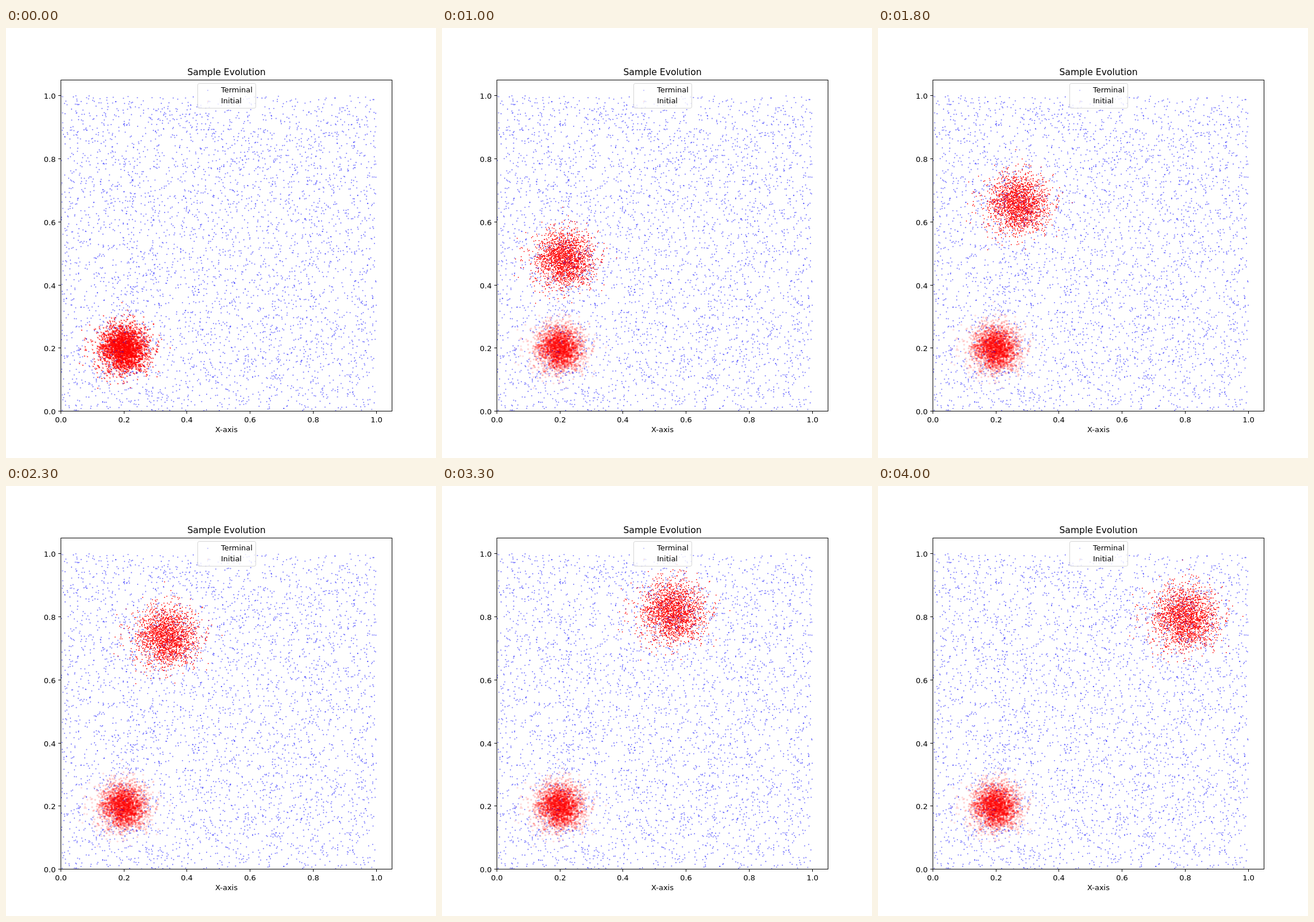
These frames come from a looping animation (748x748 px, 4100 ms). An HTML page with a canvas:

```html
<!DOCTYPE html>
<html lang="en">
<head>
<meta charset="utf-8">
<title>Sample Evolution</title>
<style>
  html, body { margin: 0; width: 100%; height: 100%; overflow: hidden; background: #fff; }
  canvas { display: block; }
</style>
</head>
<body>
<canvas id="stage" width="748" height="748"></canvas>
<script>
const ctx = document.getElementById('stage').getContext('2d');
const STEP = 100, STEPS = 41;
const LEFT = 95.5, TOP = 90.5, SIZE = 576, BOTTOM = TOP + SIZE;
const UNIT = SIZE / 1.05;
const px = x => LEFT + x * UNIT;
const py = y => BOTTOM - y * UNIT;

let seed = 20240;
function random() {
  seed = (seed + 0x6D2B79F5) | 0;
  let r = Math.imul(seed ^ (seed >>> 15), 1 | seed);
  r = (r + Math.imul(r ^ (r >>> 7), 61 | r)) ^ r;
  return ((r ^ (r >>> 14)) >>> 0) / 4294967296;
}
function gaussian() {
  const r = Math.sqrt(-2 * Math.log(1 - random()));
  const a = 2 * Math.PI * random();
  return { x: r * Math.cos(a), y: r * Math.sin(a), r };
}
const samples = Array.from({ length: 2000 }, gaussian);
const uniform = Array.from({ length: 4000 }, () => ({ x: random(), y: random() }));

function dot(x, y, radius, color) {
  ctx.fillStyle = color;
  ctx.beginPath();
  ctx.arc(x, y, radius, 0, 2 * Math.PI);
  ctx.fill();
}

function text(str, x, y, align = 'center', size = 13) {
  ctx.font = `${size}px "DejaVu Sans", sans-serif`;
  ctx.textAlign = align;
  ctx.fillStyle = '#000';
  ctx.fillText(str, x, y);
}

// Mean and spread of the moving cloud for s in 0..1
function cloud(s) {
  return {
    x: 0.2 + 0.6 * s ** 2.68,
    y: 0.2 + 0.6 * (2.1 * s - 0.7 * s ** 2 - 0.4 * s ** 3),
    sd: 0.04 + 0.01 * Math.sqrt(s)
  };
}

function drawSamples(s) {
  for (const p of samples) {
    const alpha = Math.max(0.12, 0.42 - 0.1 * p.r);
    dot(px(0.2 + 0.04 * p.x), py(0.2 + 0.04 * p.y), 1.7, `rgba(255,0,0,${alpha})`);
  }
  const c = cloud(s);
  ctx.fillStyle = '#f00';
  for (const p of samples) {
    ctx.fillRect(Math.round(px(c.x + c.sd * p.x)), Math.round(py(c.y + c.sd * p.y)), 1.5, 1.5);
  }
  for (const p of uniform) dot(px(p.x), py(p.y), 1.05, 'rgba(0,0,255,0.5)');
}

function drawAxes() {
  ctx.strokeStyle = '#000';
  ctx.lineWidth = 1;
  ctx.strokeRect(LEFT, TOP, SIZE, SIZE);
  ctx.beginPath();
  for (let i = 0; i <= 5; i++) {
    const label = (i / 5).toFixed(1);
    const x = Math.floor(px(i / 5)) + 0.5, y = Math.floor(py(i / 5)) + 0.5;
    ctx.moveTo(x, BOTTOM);
    ctx.lineTo(x, BOTTOM + 4.5);
    ctx.moveTo(LEFT, y);
    ctx.lineTo(LEFT - 4.5, y);
    text(label, x, 686);
    text(label, 86.5, y + 5, 'right');
  }
  ctx.stroke();
  text('X-axis', 383.5, 703);
  text('Sample Evolution', 383.5, 82, 'center', 15.6);
}

function drawLegend() {
  ctx.beginPath();
  ctx.roundRect(333.5, 96.5, 101, 43, 2.6);
  ctx.fillStyle = 'rgba(255,255,255,0.8)';
  ctx.fill();
  ctx.strokeStyle = 'rgba(204,204,204,0.8)';
  ctx.stroke();
  dot(351, 108.5, 1, 'rgba(0,0,255,0.3)');
  dot(351, 127.5, 1, 'rgba(255,0,0,0.15)');
  text('Terminal', 374, 112, 'left');
  text('Initial', 374, 131, 'left');
}

let shown = -1;
function render() {
  const step = Math.floor(performance.now() / STEP) % STEPS;
  if (step !== shown) {
    shown = step;
    ctx.fillStyle = '#fff';
    ctx.fillRect(0, 0, 748, 748);
    ctx.save();
    ctx.beginPath();
    ctx.rect(LEFT, TOP, SIZE, SIZE);
    ctx.clip();
    drawSamples(step / (STEPS - 1));
    ctx.restore();
    drawAxes();
    drawLegend();
  }
  requestAnimationFrame(render);
}
render();
</script>
</body>
</html>
```
